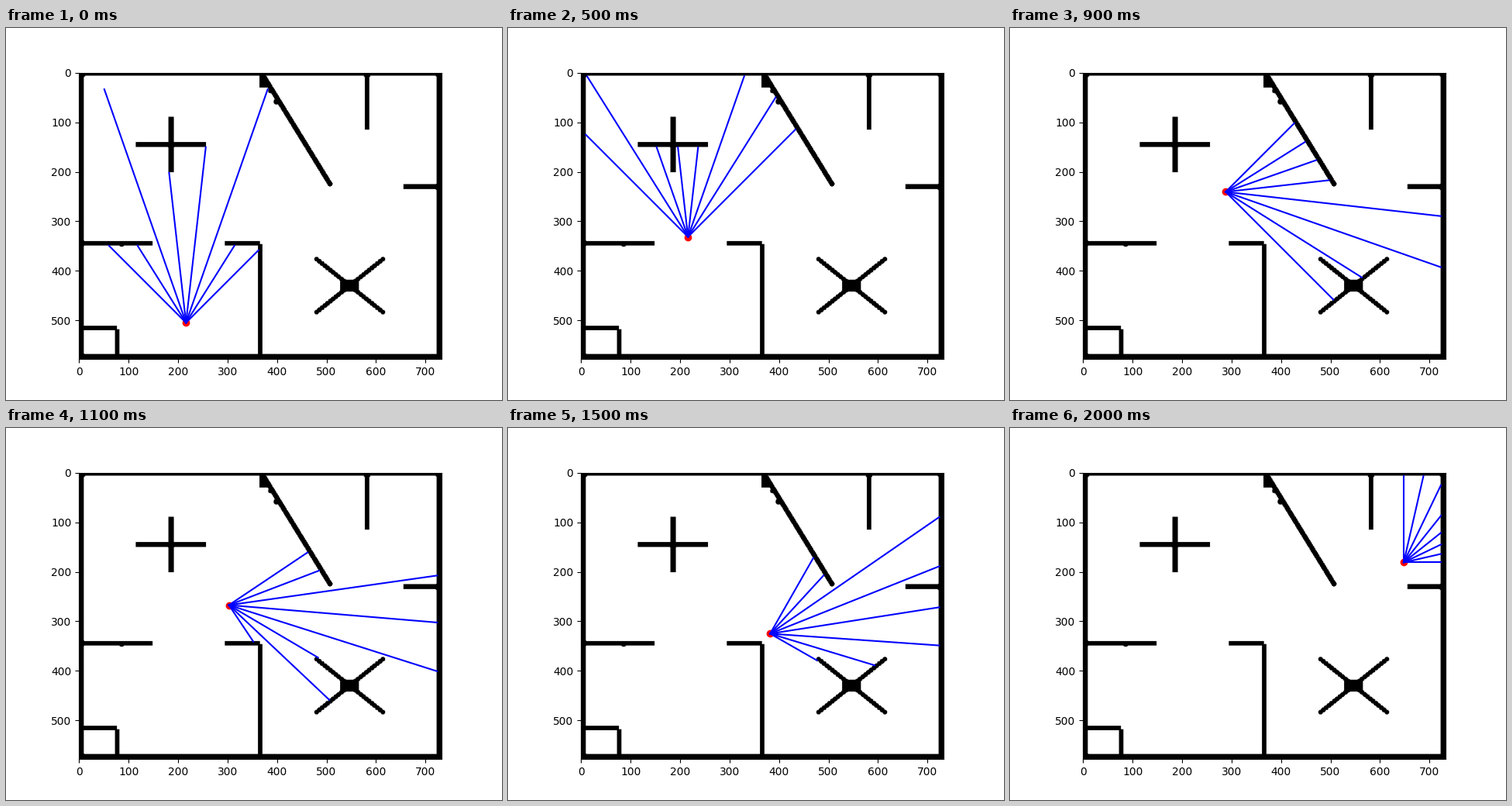
Recreate the animation shown at these times as a matplotlib script. Size 640 by 480 pixels, loop 2100 ms.

```python
import numpy as np
import matplotlib.pyplot as plt
from matplotlib.animation import FuncAnimation

W, H = 733, 579
FRAMES, RAYS, REACH = 21, 8, 500

wall = np.zeros((H, W), bool)
gy, gx = np.mgrid[:H, :W]


def rect(x0, y0, x1, y1):
    wall[y0:y1, x0:x1] = True


def disc(x, y, r):
    wall[(gx - x) ** 2 + (gy - y) ** 2 <= r * r] = True


def beads(x0, y0, x1, y1, r, gap):
    """Rough slanted wall made of overlapping discs."""
    n = int(np.hypot(x1 - x0, y1 - y0) / gap) + 1
    for t in np.linspace(0, 1, n):
        disc(x0 + t * (x1 - x0), y0 + t * (y1 - y0), r)


def build_map():
    # outer frame
    rect(0, 0, W, 7)
    rect(0, 569, W, H)
    rect(0, 0, 10, H)
    rect(723, 0, W, H)
    for x in (6, 727):
        for y in (4, 573):
            disc(x, y, 7)

    # cross
    rect(115, 141, 257, 151)
    rect(181, 90, 192, 202)
    disc(186, 146, 8)

    # lower left rooms
    rect(0, 341, 149, 350)
    disc(6, 345, 7)
    disc(86, 347, 5)
    rect(295, 341, 366, 350)
    rect(362, 347, 371, H)
    rect(0, 512, 77, 521)
    rect(73, 519, 82, H)

    # slanted wall with its wedge at the top
    beads(370, 3, 507, 225, 5.2, 5)
    wall[(gx >= 365) & (gx <= 386) & (gy <= 30) & (gy >= (gx - 366) * 1.5)] = True
    disc(387, 37, 5)
    disc(399, 59, 6)

    # stubs
    rect(578, 0, 587, 116)
    disc(582, 5, 7)
    rect(656, 226, 725, 236)
    disc(725, 231, 7)

    # X-shaped obstacle
    beads(480, 377, 614, 484, 4.9, 7)
    beads(480, 484, 614, 377, 4.9, 7)
    rect(528, 419, 566, 443)


build_map()

# pose keys: frame, x, y, heading in degrees (y points down)
KEYS = np.array([
    (0, 216, 505, -90),
    (2, 216, 420, -90),
    (5, 216, 331.5, -90),
    (6, 216, 301, -90),
    (9, 288, 240.5, 0),
    (13, 317.5, 294, 22.4),
    (15, 382, 325, -15.3),
    (18, 541, 260, -45),
    (20, 648, 181, -45),
]).T


def pose(i):
    return [np.interp(i, KEYS[0], row) for row in KEYS[1:]]


def cast(x, y, angle):
    """End point of a ray: first wall cell, or full reach."""
    r = np.arange(REACH + 1)
    px, py = x + r * np.cos(angle), y + r * np.sin(angle)
    col = np.clip(px.astype(int), 0, W - 1)
    row = np.clip(py.astype(int), 0, H - 1)
    hit = wall[row, col]
    k = hit.argmax() if hit.any() else REACH
    return px[k], py[k]


fig, ax = plt.subplots(figsize=(6.4, 4.8), dpi=100)
ax.imshow(~wall, cmap="gray", vmin=0, vmax=1)
robot, = ax.plot([], [], "ro")
beams = [ax.plot([], [], "b-")[0] for _ in range(RAYS)]
ax.set_xlim(-0.5, W - 0.5)
ax.set_ylim(H - 0.5, -0.5)


def update(i):
    x, y, heading = pose(i)
    robot.set_data([x], [y])
    fan = np.radians(heading + np.linspace(-45, 45, RAYS))
    for beam, angle in zip(beams, fan):
        ex, ey = cast(x, y, angle)
        beam.set_data([x, ex], [y, ey])
    return [robot, *beams]


anim = FuncAnimation(fig, update, frames=FRAMES, interval=100, repeat=True)
plt.show()
```
